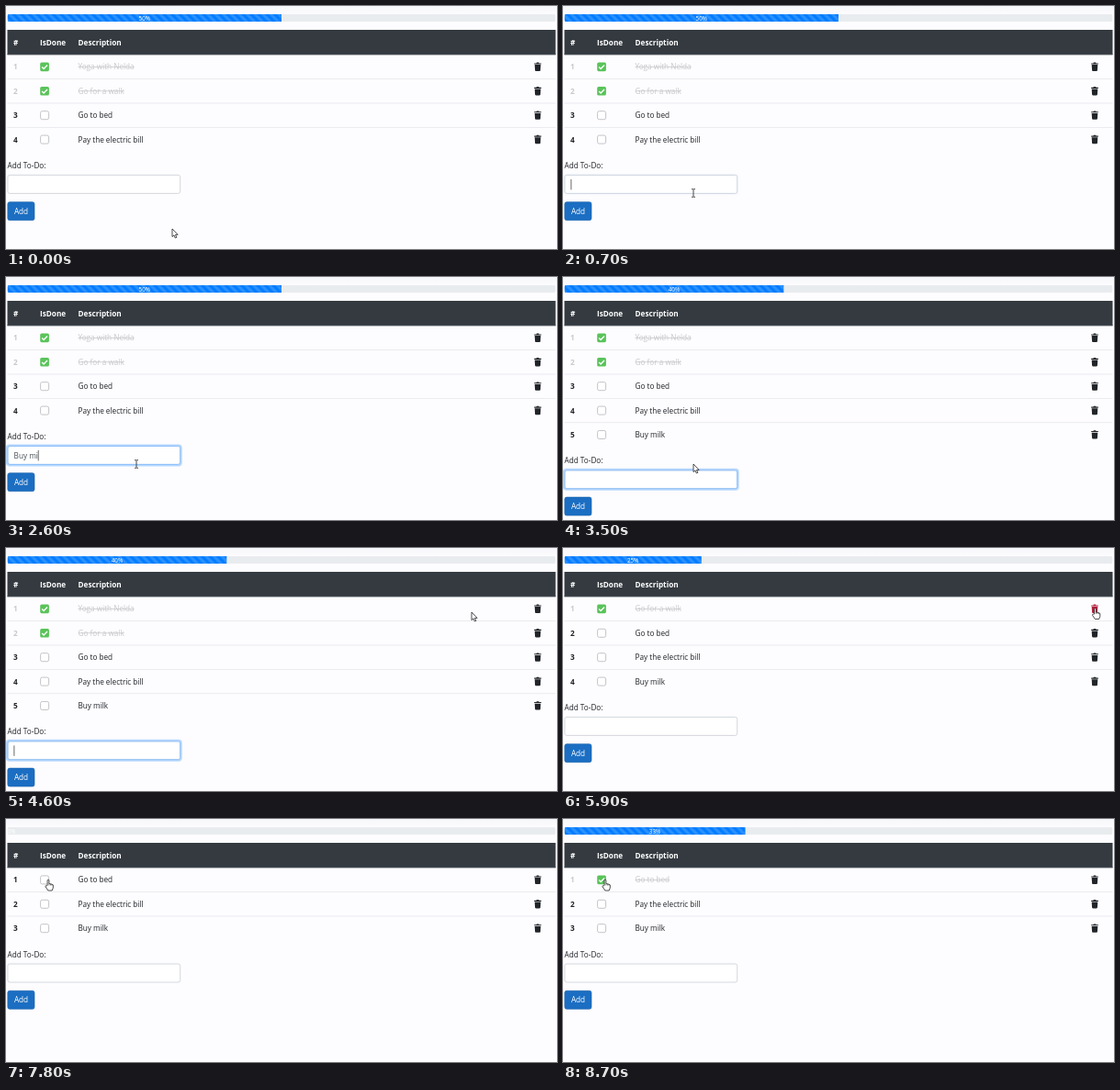
An HTML page for the animation above (8.8 s loop, 600 px wide and 265 px high).

```html
<!DOCTYPE html>
<html lang="en">
<head>
<meta charset="utf-8">
<title>To-do list</title>
<style>
  html, body { margin: 0; width: 100%; height: 100%; overflow: hidden; background: #fdfcfe; }
  svg { display: block; width: 100vw; height: 100vh; font: 8.2px "Open Sans", "Noto Sans", sans-serif; fill: #212529; }
  .bold { font-weight: 700; }
  .done { fill: #c9c9cc; }
  .strike { text-decoration: line-through; }
</style>
</head>
<body>
<svg viewBox="0 0 600 265" xmlns="http://www.w3.org/2000/svg">
  <defs>
    <linearGradient id="top" x2="0" y2="1">
      <stop offset="0" stop-color="#f6f7fb"/><stop offset="1" stop-color="#fdfcfe"/>
    </linearGradient>
    <pattern id="stripes" width="8.62" height="8.62" patternUnits="userSpaceOnUse">
      <path d="M0 8.62V4.31L4.31 8.62ZM0 0H4.31L8.62 4.31V8.62Z" fill="#fff" fill-opacity=".17"/>
    </pattern>
    <clipPath id="track"><rect x="1.5" y="8.7" width="597" height="8.6" rx="2.2"/></clipPath>
    <g id="trash">
      <path d="M-3.8-4h2.2l.5-.8h2.2l.5.8h2.2v1.1h-7.6Z"/>
      <path d="M-3.3-2.3h6.6l-.4 6.1a.9.9 0 0 1-.9.8h-4a.9.9 0 0 1-.9-.8Z"/>
    </g>
    <g id="off"><rect x="-4.4" y="-4.5" width="9" height="9" rx="1.8" fill="#fff" stroke="#bdbfc3" stroke-width=".9"/></g>
    <g id="on">
      <rect x="-4.8" y="-4.8" width="9.7" height="9.6" rx="1.6" fill="#5ac35a"/>
      <path d="M-2.8.1l1.9 2 3.9-4" fill="none" stroke="#fff" stroke-width="1.4"/>
    </g>
    <g id="arrow" stroke="#222" stroke-width=".8" fill="#fff">
      <path d="M0 0V8.6L2 6.9 3.3 10 4.8 9.4 3.5 6.4H6.1Z"/>
    </g>
    <g id="ibeam" fill="none" stroke="#333" stroke-width=".9">
      <path d="M-2-4.3H-.6L0-3.8.6-4.3H2M0-3.8V3.8M-2 4.3H-.6L0 3.8.6 4.3H2"/>
    </g>
    <g id="hand" stroke="#222" stroke-width=".8" fill="#fff">
      <path d="M-.9 6V.6a.9.9 0 0 1 1.8 0V4l1.6.3 1.5.4 1.3.7V8.5L4.2 11.5H-.2L-2.9 7.4c-.5-1 .6-1.7 1.2-1.1Z"/>
      <path d="M.9 4V6M2.5 4.3V6M4 4.7V6.2" fill="none" stroke-width=".5"/>
    </g>
  </defs>

  <rect width="600" height="265" fill="#fdfcfe"/>
  <rect width="600" height="9" fill="url(#top)"/>

  <g clip-path="url(#track)">
    <rect x="1.5" y="8.7" width="597" height="8.6" fill="#e9ecef"/>
    <rect class="bar" x="1.5" y="8.7" height="8.6" fill="#007bff"/>
    <rect class="bar" x="1.5" y="8.7" height="8.6" fill="url(#stripes)"/>
    <text id="percent" y="15.5" font-size="6.3" text-anchor="middle" fill="#fff"></text>
  </g>

  <rect x="1.5" y="26" width="597" height="27.2" fill="#343a40"/>
  <rect x="1.5" y="52.2" width="597" height="1" fill="#454d55"/>
  <g class="bold" fill="#fff">
    <text x="8" y="42.6">#</text><text x="37" y="42.6">IsDone</text><text x="78.5" y="42.6">Description</text>
  </g>
  <g id="rows"></g>

  <g id="form">
    <text x="1.5" y="177">Add To-Do:</text>
    <rect id="glow" x=".8" y="183.3" width="190" height="22.2" rx="2.8" fill="none" stroke="#007bff" stroke-opacity=".28" stroke-width="1.8"/>
    <rect x="1.9" y="184.4" width="187.8" height="20" rx="2.2" fill="#fff" stroke="#ced4da" stroke-width=".9"/>
    <rect id="ring" x="1.9" y="184.4" width="187.8" height="20" rx="2.2" fill="none" stroke="#80bdff" stroke-width=".9"/>
    <text id="entry" x="8.6" y="198.1" fill="#495057"></text>
    <rect id="caret" y="189" width=".8" height="11.4" fill="#444"/>
    <rect x="1.8" y="213.7" width="29.2" height="20" rx="2.2" fill="#1b6ec2" stroke="#1861ac" stroke-width=".6"/>
    <text x="16.5" y="226.7" fill="#fff" text-anchor="middle">Add</text>
  </g>
  <use id="cursor"/>
</svg>
<script>
const LOOP = 8800, ROW = 26.4, TOP = 53.2, WIDTH = 597;
const FOCUS = 690, ADD = 3200, DROP1 = 5500, DROP2 = 6400, CHECK = 8000;
const NEW = "Buy milk";
const keys = [1300, 1500, 1700, 1900, 2200, 2500, 2750, 2950];
// time, x, y of the pointer's hot spot
const path = [
  [100, 181, 243], [600, 142, 204], [3700, 142, 204], [4600, 507, 70], [5200, 579.5, 66],
  [6400, 579.5, 66], [6700, 516, 79], [7200, 87, 84], [7700, 46, 66.5]
];
// time, share done before and after
const shares = [[ADD, 50, 40], [DROP1, 40, 25], [DROP2, 25, 0], [CHECK, 0, 33]];

const $ = id => document.getElementById(id);
const bars = document.querySelectorAll(".bar");
const clamp = v => Math.max(0, Math.min(1, v));
const smooth = v => v * v * (3 - 2 * v);

function itemsAt(t) {
  const list = [];
  if (t < DROP1) list.push(["Yoga with Nelda", true]);
  if (t < DROP2) list.push(["Go for a walk", true]);
  list.push(["Go to bed", t >= CHECK], ["Pay the electric bill", false]);
  if (t >= ADD) list.push([NEW, false]);
  return list;
}

function pointerAt(t) {
  let i = 0;
  while (i < path.length - 2 && t > path[i + 1][0]) i++;
  const [t0, x0, y0] = path[i], [t1, x1, y1] = path[i + 1];
  const k = smooth(clamp((t - t0) / (t1 - t0)));
  return [x0 + (x1 - x0) * k, y0 + (y1 - y0) * k];
}

function rowMarkup([name, done], i, hot) {
  const y = TOP + ROW * i, mid = y + 13.2, base = mid + 3;
  const tone = done ? "done" : "";
  const line = i ? `<rect x="1.5" y="${y - .3}" width="597" height=".6" fill="#dee2e6"/>` : "";
  return `${line}<text class="bold ${tone}" x="8" y="${base}">${i + 1}</text>
    <use href="#${done ? "on" : "off"}" x="42" y="${mid}"/>
    <text class="${tone} ${done ? "strike" : ""}" x="78.5" y="${base}">${name}</text>
    <use href="#trash" x="579" y="${mid}" fill="${hot ? "#b3203c" : "#212529"}"/>`;
}

let drawn = "";
function drawRows(items, hot) {
  const markup = items.map((item, i) => rowMarkup(item, i, i === hot)).join("");
  if (markup !== drawn) $("rows").innerHTML = drawn = markup;
}

function drawBar(t) {
  let from = 50, to = 50, start = 0;
  for (const [at, a, b] of shares) if (t >= at) [start, from, to] = [at, a, b];
  const k = clamp((t - start) / 300);
  const w = WIDTH * (from + (to - from) * (1 - (1 - k) ** 2.5)) / 100;
  bars.forEach(b => b.setAttribute("width", w));
  $("stripes").setAttribute("patternTransform", `translate(${1.5 - 8.62 * (t % 500) / 500} 8.7)`);
  $("percent").textContent = to + "%";
  $("percent").setAttribute("x", 1.5 + Math.max(w / 2, 4.6));
}

function drawForm(t, shift) {
  $("form").setAttribute("transform", `translate(0 ${shift})`);
  const focus = t < DROP1 ? clamp((t - FOCUS) / 150) : 0;
  $("glow").setAttribute("opacity", focus);
  $("ring").setAttribute("opacity", focus);

  const typed = t < ADD ? keys.filter(k => t >= k).length : 0;
  const entry = $("entry");
  entry.textContent = NEW.slice(0, typed);
  const last = t >= ADD ? ADD : typed ? keys[typed - 1] : FOCUS;
  const lit = t >= FOCUS && t < DROP1 && Math.floor((t - last) / 300) % 2 === 0;
  $("caret").setAttribute("visibility", lit ? "visible" : "hidden");
  $("caret").setAttribute("x", 8.5 + (typed ? entry.getComputedTextLength() : 0));
}

function render(t) {
  const items = itemsAt(t), shift = (items.length - 4) * ROW;
  const [x, y] = pointerAt(t);
  const row = Math.floor((y - TOP) / ROW);
  const near = row >= 0 && row < items.length && Math.abs(y - TOP - ROW * (row + .5)) < 5;
  const onTrash = near && Math.abs(x - 579) < 5;
  const onCheck = near && Math.abs(x - 42) < 5;
  const inField = x < 190 && y > 184 + shift && y < 205 + shift;

  drawBar(t);
  drawRows(items, onTrash ? row : -1);
  drawForm(t, shift);
  $("cursor").setAttribute("href", inField ? "#ibeam" : onTrash || onCheck ? "#hand" : "#arrow");
  $("cursor").setAttribute("x", x);
  $("cursor").setAttribute("y", y);
}

const begin = performance.now();
function tick() {
  render((performance.now() - begin) % LOOP);
  requestAnimationFrame(tick);
}
tick();
</script>
</body>
</html>
```
